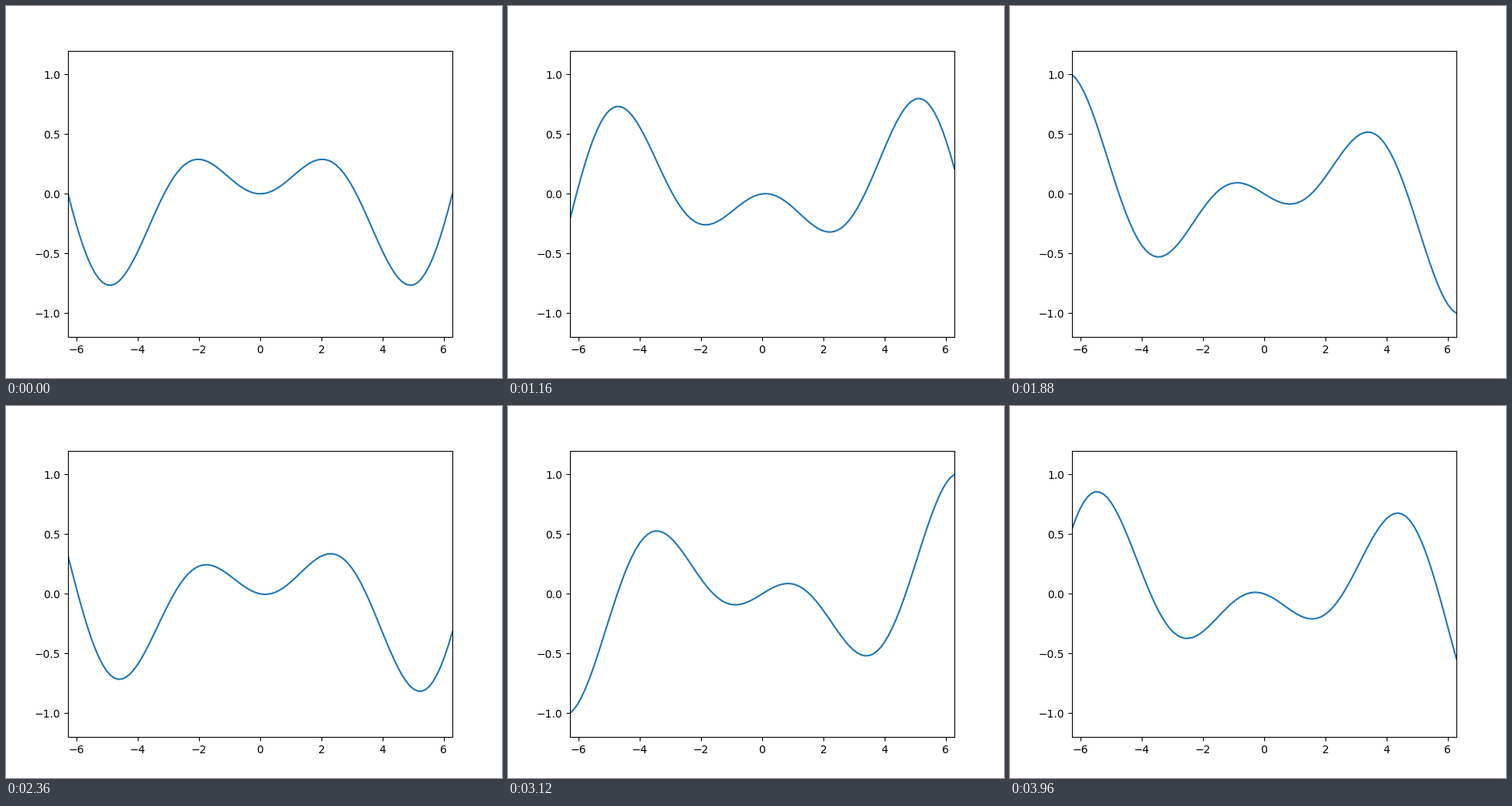
A matplotlib script for the animation above (4000 ms loop, 640 by 480 pixels).

```python
import numpy as np
import matplotlib.pyplot as plt
from matplotlib.animation import FuncAnimation

FRAMES = 100
INTERVAL = 40  # ms

x = np.linspace(-2 * np.pi, 2 * np.pi, 100)
phases = np.linspace(0, 10, FRAMES)


def wave(phase):
    return x / (2 * np.pi) * np.sin(x + phase)


fig, ax = plt.subplots(figsize=(6.4, 4.8), dpi=100)
ax.set_xlim(-2 * np.pi, 2 * np.pi)
ax.set_ylim(-1.2, 1.2)
line, = ax.plot(x, wave(0), color="#1f77b4", lw=1.5)


def update(i):
    line.set_ydata(wave(phases[i]))
    return line,


anim = FuncAnimation(fig, update, frames=FRAMES, interval=INTERVAL,
                     repeat=True, repeat_delay=0)
plt.show()
```
